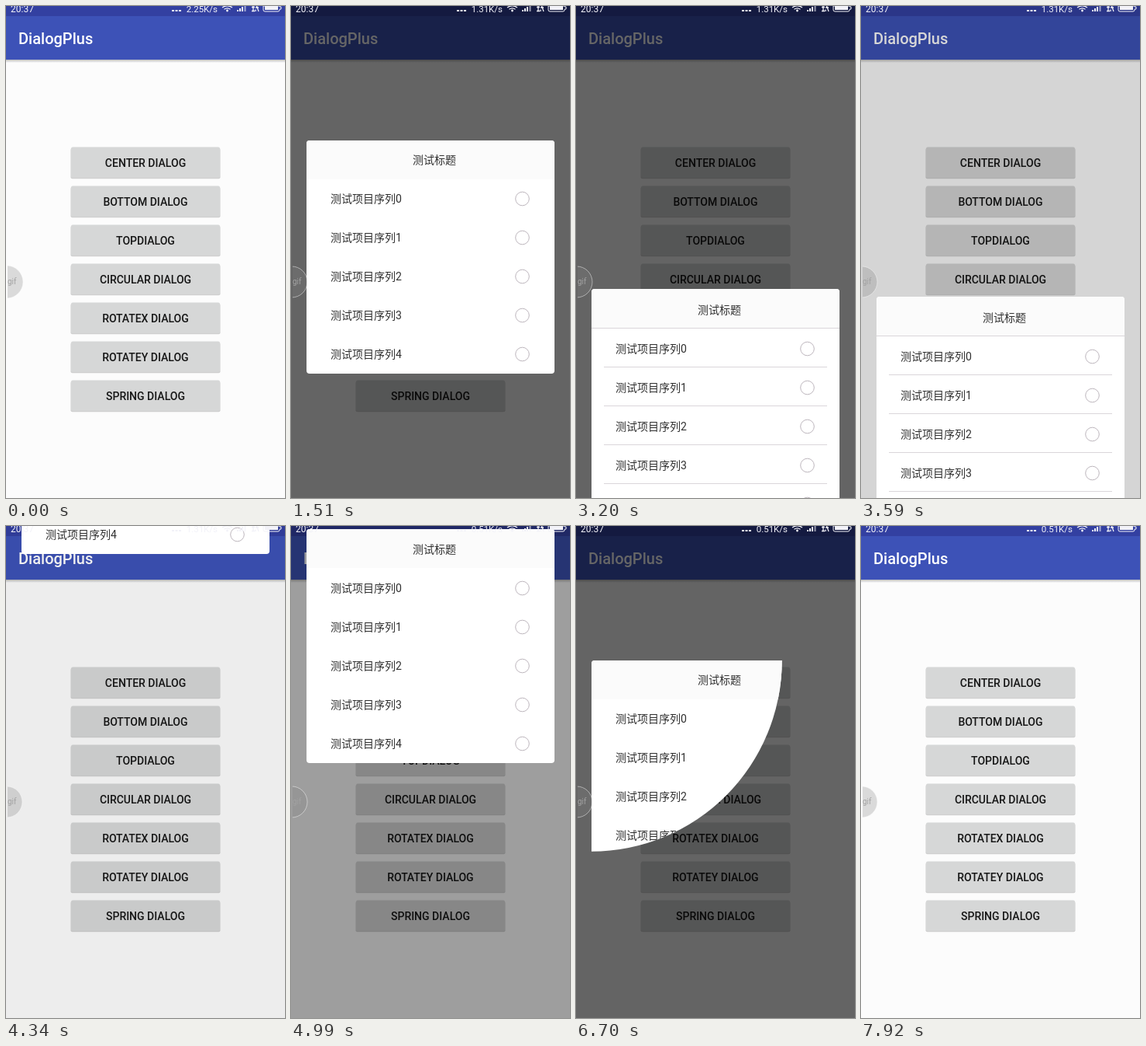
An HTML page for the animation above (8000 ms loop, 360x633 px).

```html
<!DOCTYPE html>
<html lang="en">
<head>
<meta charset="utf-8">
<title>DialogPlus</title>
<style>
html, body { margin: 0; width: 100%; height: 100%; overflow: hidden; background: #fcfcfc; }
svg { display: block; width: 360px; height: 633px; }
text { font-family: Roboto, "Noto Sans CJK SC", "Noto Sans CJK", sans-serif; }
</style>
</head>
<body>
<svg id="stage" viewBox="0 0 360 633" xmlns="http://www.w3.org/2000/svg">
  <defs>
    <linearGradient id="fall" x1="0" y1="0" x2="0" y2="1">
      <stop offset="0" stop-opacity=".25"/>
      <stop offset="1" stop-opacity="0"/>
    </linearGradient>
    <clipPath id="reveal"><circle id="hole" r="600"/></clipPath>
    <clipPath id="edge"><rect x="2" y="320" width="40" height="70"/></clipPath>
  </defs>

  <rect width="360" height="633" fill="#fcfcfc"/>
  <rect width="360" height="69" fill="#3d52b7"/>
  <rect width="360" height="13" fill="#3340a1"/>
  <rect y="69" width="360" height="4" fill="url(#fall)"/>
  <text x="16" y="49" font-size="20" font-weight="500" fill="#fff">DialogPlus</text>
  <g id="buttons"></g>

  <rect id="dim" width="360" height="633" opacity="0"/>

  <g id="dialog" clip-path="url(#reveal)">
    <rect id="card" width="320" height="300" rx="4" fill="#fff"/>
    <path d="M0 50V4a4 4 0 0 1 4-4H316a4 4 0 0 1 4 4V50Z" fill="#fbfbfb"/>
    <g id="lines" stroke="#dad6da"></g>
    <g id="rows"></g>
  </g>

  <g clip-path="url(#edge)">
    <circle id="badge" cx="1" cy="355" r="20" fill="#808080" fill-opacity=".28" stroke="#fff" stroke-opacity=".45"/>
    <text x="2" y="358" font-size="10" fill="#a2a2a2">gif</text>
  </g>

  <g fill="#f2f2f8">
    <text x="6" y="7.5" font-size="12">20:37</text>
    <text id="speed" x="273" y="7.5" font-size="11.5" text-anchor="end"></text>
    <path d="M214 5h3v2h-3zM218.500 5h3v2h-3zM223 5h3v2h-3z"/>
    <path d="M298 5h2v2h-2zM301 3h2v4h-2zM304 1h2v6h-2z"/>
    <path d="M307.500 0h2v7h-2z" opacity=".6"/>
    <g fill="none" stroke="#f2f2f8" stroke-width="1.300">
      <path d="M279 2q6.500-4.500 13 0M281.500 4.300q4-3 8 0"/>
      <path d="M317 1.500h4M319 0v6.500M317 6.500h4M322 2h4M323.500 0l2.500 7M322 4.500v2.500"/>
    </g>
    <circle cx="285.500" cy="6" r="1.400"/>
    <path d="M332 0H353V1H355V4H353V5Q353 7 351 7H334Q332 7 332 5Z" fill="none" stroke="#f2f2f8"/>
    <path d="M334 0h17v5h-17z"/>
  </g>
</svg>
<script>
const LOOP = 8000;
const DIM = 0.6, DIM_TIME = 220;
const TRAVEL = 320, RADIUS = Math.hypot(320, 300);
const NS = "http://www.w3.org/2000/svg";
const $ = id => document.getElementById(id);

function add(parent, tag, attrs, text) {
  const el = document.createElementNS(NS, tag);
  for (const k in attrs) el.setAttribute(k, attrs[k]);
  if (text) el.textContent = text;
  parent.appendChild(el);
  return el;
}
const set = (el, k, v) => el.setAttribute(k, v);
const ramp = (t, start, length) => Math.min(1, Math.max(0, (t - start) / length));
const easeOut = p => 1 - (1 - p) ** 2;
const easeBoth = p => (1 - Math.cos(Math.PI * p)) / 2;

const names = ["CENTER DIALOG", "BOTTOM DIALOG", "TOPDIALOG", "CIRCULAR DIALOG",
  "ROTATEX DIALOG", "ROTATEY DIALOG", "SPRING DIALOG"];

const buttons = names.map((name, i) => {
  const y = 181.5 + i * 50;
  const box = { x: 84, y, width: 192, height: 39.5, rx: 2 };
  const glow = add($("buttons"), "rect",
    { x: 82, y: y - 1, width: 196, height: 45, rx: 4, opacity: 0 });
  add($("buttons"), "rect", { ...box, x: 83.5, width: 193, y: y + 1.3, opacity: 0.18 });
  const face = add($("buttons"), "rect", { ...box, fill: "#d6d7d7" });
  add($("buttons"), "text", { x: 180, y: y + 25, "font-size": 14, "font-weight": 500,
    "text-anchor": "middle", fill: "#161616" }, name);
  return { glow, face };
});

// Dialog contents
const label = { "font-size": 14, fill: "#303030" };
add($("rows"), "text", { ...label, x: 165, y: 30.3, "text-anchor": "middle" }, "测试标题");
for (let i = 0; i < 5; i++) {
  const y = 75 + i * 50;
  add($("rows"), "text", { ...label, x: 31, y: y + 5.3 }, "测试项目序列" + i);
  add($("rows"), "circle", { cx: 278.5, cy: y, r: 8.8, fill: "#fff", stroke: "#bdb6bd" });
  const inset = i ? 16 : 0;
  add($("lines"), "path", { d: `M${inset} ${y - 24.5}H${320 - inset}` });
}

const presses = [[0, 840, 980], [1, 2680, 2880], [2, 4040, 4210], [3, 5470, 5640], [4, 7790, 7915]];

// in/out: start and length of each move; fade: when the dimming starts to lift;
// pad: extra space above the rows
const dialogs = [
  { kind: "center", in: [1100, 370], out: [2100, 180], fade: 2085, pad: 0 },
  { kind: "bottom", in: [2960, 400], out: [3430, 370], fade: 3428, pad: 2 },
  { kind: "top", in: [4320, 370], out: [4908, 370], fade: 4908, pad: 1 },
  { kind: "circle", in: [5670, 350], out: [6581, 260], fade: 6840, pad: 0 }
];

function place(d, t) {
  const enter = ramp(t, ...d.in), leave = ramp(t, ...d.out);
  let y = 173, scale = 1, alpha = 1, radius = 600;
  const shift = TRAVEL * (1 - easeOut(enter) + leave ** 2);
  if (d.kind === "bottom") y = Math.round(313 + shift);
  if (d.kind === "top") y = Math.round(20 - shift);
  if (d.kind === "circle" && (enter < 1 || leave > 0))
    radius = RADIUS * (easeBoth(enter) - easeBoth(leave));
  if (d.kind === "center") {
    alpha = easeOut(enter) * (1 - leave);
    scale = 0.9 + 0.1 * easeOut(enter) - 0.08 * leave;
  }
  set($("dialog"), "transform",
    `translate(180 ${y + 150}) scale(${scale}) translate(-160 -150)`);
  set($("dialog"), "opacity", alpha);
  set($("hole"), "r", Math.max(0, radius));
  set($("lines"), "visibility", d.kind === "bottom" ? "inherit" : "hidden");
  set($("rows"), "transform", `translate(0 ${d.pad})`);
  set($("card"), "height", 300 + d.pad);
}

function draw(t) {
  set($("badge"), "r", t < 110 ? 21 : 20);
  const speed = t < 390 ? "2.25K/s" : t < 4400 ? "1.31K/s" : "0.51K/s";
  if ($("speed").textContent !== speed) $("speed").textContent = speed;

  for (const [i, start, end] of presses) {
    const p = Math.sin(Math.PI * ramp(t, start, end - start));
    const c = Math.round(214 - 24 * p);
    set(buttons[i].face, "fill", `rgb(${c},${c + 1},${c + 1})`);
    set(buttons[i].glow, "opacity", 0.2 * p);
  }

  let dim = 0, open = null;
  for (const d of dialogs) {
    dim += DIM * (ramp(t, d.in[0], DIM_TIME) - ramp(t, d.fade, DIM_TIME));
    if (t > d.in[0] && t < d.out[0] + d.out[1]) open = d;
  }
  set($("dim"), "opacity", Math.max(0, dim));
  set($("dialog"), "visibility", open ? "visible" : "hidden");
  if (open) place(open, t);
}

const began = performance.now();
function tick() {
  draw((performance.now() - began) % LOOP);
  requestAnimationFrame(tick);
}
tick();
</script>
</body>
</html>
```
